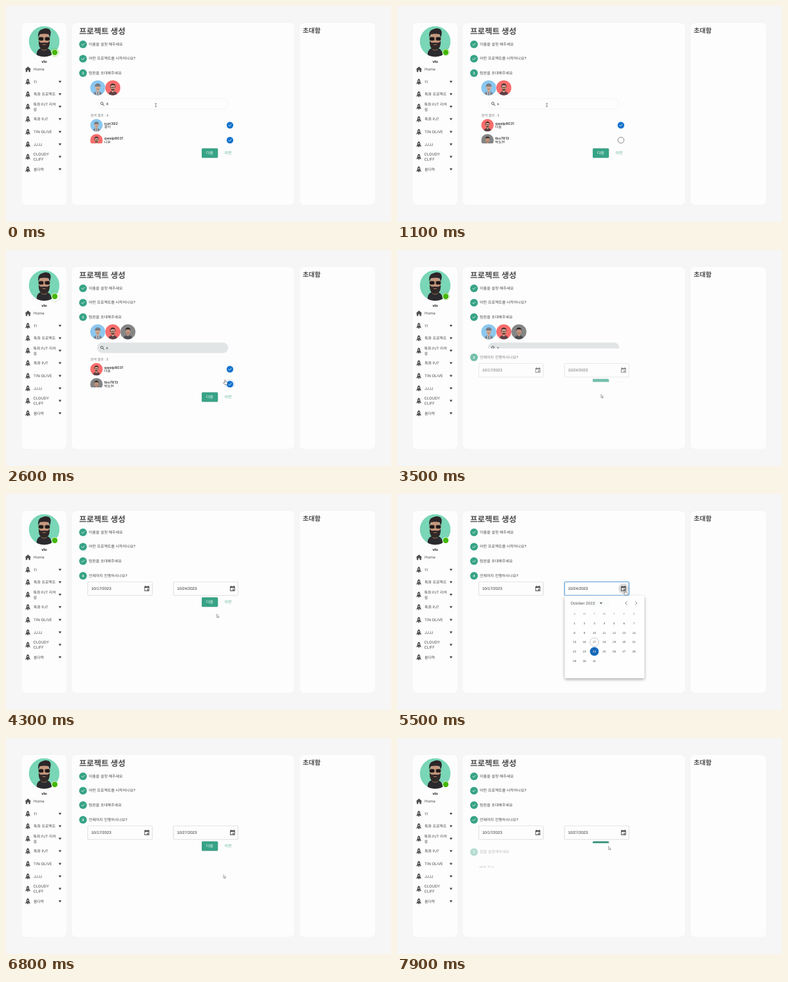
An HTML page that plays this animation: 600 px wide and 338 px high, repeating every 8 s.

```html
<!DOCTYPE html>
<html lang="ko">
<head>
<meta charset="utf-8">
<title>프로젝트 생성</title>
<style>
html, body { margin: 0; width: 100%; height: 100%; overflow: hidden; background: #f6f6f7; }
svg { display: block; width: 600px; height: 338px; }
text { font-family: Inter, "Noto Sans CJK KR", "Noto Sans CJK", sans-serif; fill: #4a4a4a; text-rendering: geometricPrecision; }
.num { font-family: "Liberation Sans", sans-serif; }
.panel { fill: #fdfdfd; stroke: #f0f0f1; stroke-width: .6; }
.line { fill: none; stroke-linecap: round; stroke-linejoin: round; }
.button { filter: drop-shadow(0 .6px .7px rgba(0, 0, 0, .35)); }
#paper { filter: drop-shadow(0 2px 2.5px rgba(0, 0, 0, .35)); }
</style>
</head>
<body>
<svg id="stage" viewBox="0 0 600 338"></svg>
<script>
const LOOP = 8000;
const GREEN = '#37a386', BLUE = '#1472cc', INK = '#4a4a4a';
const stage = document.getElementById('stage');
const $ = id => document.getElementById(id);

// Drawing helpers; text is placed by its vertical centre.
const text = (x, y, s, size = 6, attrs = '') =>
  `<text x="${x}" y="${(y + size * .36).toFixed(2)}" font-size="${size}" ${attrs}>${s}</text>`;
const circle = (x, y, r, fill, attrs = '') => `<circle cx="${x}" cy="${y}" r="${r}" fill="${fill}" ${attrs}/>`;
const rect = (x, y, w, h, r, attrs = '') => `<rect x="${x}" y="${y}" width="${w}" height="${h}" rx="${r}" ${attrs}/>`;
const path = (d, fill, attrs = '') => `<path d="${d}" fill="${fill}" ${attrs}/>`;
const line = (d, color, w = 1) => `<path class="line" d="${d}" stroke="${color}" stroke-width="${w}"/>`;
const at = (x, y, body, scale = 1) => `<g transform="translate(${x} ${y}) scale(${scale})">${body}</g>`;
const use = (id, x, y) => `<use href="#${id}" x="${x}" y="${y}"/>`;
const mid = 'text-anchor="middle"';

const bust = (id, bg, skin, body, extra) => `<g id="${id}"><g clip-path="url(#disc)">
  ${circle(0, 0, 12, bg)}
  ${path('M-7 13C-7 7-4.5 5.4 0 5.4S7 7 7 13Z', body)}
  ${rect(-1.6, 2, 3.2, 5, 1.5, `fill="${skin}"`)}
  <ellipse cx="0" cy="-.7" rx="3.7" ry="4.9" fill="${skin}"/>${extra}</g></g>`;

const defs = `<defs>
  <clipPath id="disc"><circle r="11.8"/></clipPath>
  <clipPath id="bigDisc"><circle r="24"/></clipPath>
  <clipPath id="listClip"><rect x="125" y="176" width="240" height="39"/></clipPath>
  ${[3, 4, 5].map(n => `<clipPath id="clip${n}"><rect id="fold${n}" x="104" width="344"/></clipPath>`).join('')}
  ${bust('blueFace', '#8bc7ef', '#d3a88e', '#7d8894',
    path('M-4.2-2.8C-5-8 5-8 4.2-2.8L5.2-1.9H-5.2Z', '#767c84') +
    path('M-2.4 5.6L0 8L2.4 5.6L1.6 12H-1.6Z', '#dfe5ea') + path('M-.6 7H.6L.5 12H-.5Z', '#2c3743') +
    line('M-1.3 2.2H1.3', '#7a5546', .6))}
  ${bust('redFace', '#f86d6c', '#dca98f', '#5c4247',
    path('M-4.2-.5C-5.4-8.6 5.4-8.6 4.2-.5L3.2-3.4C1-4.4-1-4.4-3.2-3.4Z', '#3a2b2e') +
    line('M-3.2-1.2H-.8V.3H-3.2ZM.8-1.2H3.2V.3H.8ZM-.8-.5H.8', '#33272b', .5) +
    path('M-3 2.2C-2 1.5 2 1.5 3 2.2C2.4 5.4-2.4 5.4-3 2.2Z', '#5c4039'))}
  ${bust('grayFace', '#858585', '#c2917a', '#4a4d53',
    path('M-4-1.4C-5.2-8.2 5.2-8.2 4-1.4L3-3.8H-3Z', '#252427') + line('M-1.2 2.3H1.2', '#75564a', .6))}
  <g id="tick">${line('M-2.2 .1L-.7 1.6L2.2-1.5', '#fff', .8)}</g>
  <g id="checkOn">${circle(0, 0, 5.2, BLUE)}${use('tick', 0, 0)}</g>
  <g id="checkOff">${circle(0, 0, 4.8, '#fff', 'stroke="#555" stroke-width=".7"')}</g>
  <g id="rocket">
    ${path('M0-4.7C2.5-3.2 2.6-.4 1.9 2.5H-1.9C-2.6-.4-2.5-3.2 0-4.7Z', '#4c4c4c')}
    ${path('M-1.9 .2L-3.4 1.9V4L-1.6 3ZM1.9 .2L3.4 1.9V4L1.6 3Z', '#4c4c4c')}
    ${circle(0, 3.4, 1.1, '#4c4c4c')}${circle(0, -1.1, .9, '#fdfdfd')}</g>
  <g id="calIcon">
    ${path('M-3.8-3.4H3.8V4H-3.8ZM-2.9-1.2V3.1H2.9V-1.2Z', '#444', 'fill-rule="evenodd"')}
    ${rect(-2.7, -4.4, 1, 1.5, 0, 'fill="#444"')}${rect(1.7, -4.4, 1, 1.5, 0, 'fill="#444"')}
    ${rect(.2, .5, 2, 2, 0, 'fill="#444"')}</g>
</defs>`;

const portrait = at(59.5, 55.5, `<g clip-path="url(#bigDisc)">
  ${circle(0, 0, 24, '#79d6b6')}
  ${path('M-12 25C-12.5 14-9 10-.5 10S12 14 12 25Z', '#2b2b2f')}
  ${rect(-4.5, 5, 9, 9, 3, 'fill="#8f6351"')}
  <ellipse cx="0" cy="-3" rx="8.2" ry="11.5" fill="#c9977f"/>
  ${path('M-8.8-6C-10.5-13-8-18 -3-19C1-21.5 8-21 9.6-17C11-13 9.6-9 8.6-6L7-11C3-12.5-3-12-7-11Z', '#2c2629')}
  ${path('M-8.6-1C-6 3-4 1.8 0 1.8S6 3 8.6-1C9 8 6 13 0 13S-9 8-8.6-1Z', '#302827')}
  ${line('M-2 5H2', '#b17a6a', 1.1)}
  ${rect(-8.9, -7, 8, 5.8, 2.2, 'fill="#1e191b" stroke="#a08062" stroke-width=".6"')}
  ${rect(.9, -7, 8, 5.8, 2.2, 'fill="#1e191b" stroke="#a08062" stroke-width=".6"')}
  ${line('M-.9-5.4H.9', '#a08062', .8)}</g>`);

const MENU = [
  [118.5, '11'], [138, '특화 프로젝트'], [157.5, '특화 PJT 리허', '설'], [177, '특화 PJT'],
  [197, 'TIN OLIVE'], [216.4, 'JJJJ'], [236, 'CLOUDY', 'CLIFF'], [255.5, '봄다락'],
];
const menu = MENU.map(([y, a, b]) => use('rocket', 34, y) +
  (b ? text(42.5, y - 3.7, a, 5.9) + text(42.5, y + 4, b, 5.9) : text(43, y, a, 5.9)) +
  path(`M82 ${y - 1.5}H86.4L84.2 ${y + 2}Z`, '#444')).join('');

const sidebar = rect(24, 26, 71, 286, 8, 'class="panel"') + portrait +
  `<circle id="ripple" cx="76" cy="72.6" fill="none" stroke="#44b700" stroke-width=".7"/>` +
  circle(76, 72.6, 5.2, '#fdfdfd') + circle(76, 72.6, 4.3, '#44b700') +
  text(59.5, 87, 'vlo', 5.8, `${mid} font-weight="700" style="fill:#222"`) +
  path('M34.3 94.8L39.2 99.3H37.8V103.2H35.4V100.4H33.2V103.2H30.8V99.3H29.4Z', '#4c4c4c') +
  text(43, 99, 'Home') + menu;

const step = (n, y, label) => circle(120, y, 6, GREEN) +
  `<g id="no${n}">${text(120, y, n, 5.2, `${mid} font-weight="600" style="fill:#fff"`)}</g>` +
  `<g id="done${n}">${use('tick', 120, y)}</g>` + text(129, y - .3, label, 6, 'font-weight="500"');

const buttons = (id, y) =>
  rect(305, y - 7.2, 25.2, 14.8, 1.6, `class="button" id="${id}" fill="${GREEN}"`) +
  text(317.5, y - .2, '다음', 6, `${mid} font-weight="500" style="fill:#fff"`) +
  text(346, y - .2, '이전', 6, `${mid} style="fill:#55ae97"`);

const row = (face, y, name, nick, check) => at(141, y, use(face, 0, 0), .83) +
  text(153, y - 3, name, 5.7, 'font-weight="500" style="fill:#222"') +
  text(153, y + 3, nick, 5.5, 'style="fill:#222"') + check;
const on = y => use('checkOn', 349, y);

const invite = use('blueFace', 143, 128) + use('redFace', 166.5, 128) +
  `<g id="picked">${use('grayFace', 190, 128)}</g>` +
  rect(142, 145, 204, 16, 8, 'id="search" stroke-width=".6"') +
  circle(149.4, 152.4, 1.9, 'none', 'stroke="#333" stroke-width=".8"') + line('M150.9 153.9L152.8 155.8', '#333', .9) +
  text(156, 153, '', 5.7, 'id="query" style="fill:#222"') +
  text(131.5, 171, '', 5.2, 'id="count" style="fill:#777"') +
  `<g clip-path="url(#listClip)">
    <g id="listA">${row('blueFace', 186.5, 'nuri392', '콩이', on(186.5))}${row('redFace', 210, 'qwelp8031', '나윤', on(210))}</g>
    <g id="listB">${row('redFace', 186.5, 'qwelp8031', '나윤', on(186.5))}
      ${circle(349, 210, 8, '#e3eefa', 'id="halo"')}
      ${row('grayFace', 210, 'tbo7813', '박도현', `<use id="pick" x="349" y="210"/>`)}</g>
  </g>` + buttons('next3', 230);

const field = (x, id, value) => rect(x, 137.3, 100.6, 21.6, 1.6, `id="${id}" fill="#fdfdfd" stroke="#c8c8c8" stroke-width=".6"`) +
  text(x + 5.5, 148, value, 6.2, `class="num" id="${id}Text" style="fill:#333"`);
const dates = field(127.4, 'from', '10/17/2023') + use('calIcon', 219.5, 148) +
  field(261, 'until', '') + circle(353, 148, 8, '#dcdcdc', 'id="iconHover"') + use('calIcon', 353, 148) +
  buttons('next4', 169);

const dayX = d => 276.3 + 15.55 * ((d - 1) % 7);
const dayY = d => 203 + 14.9 * Math.floor((d - 1) / 7);
const days = Array.from({ length: 31 }, (_, i) => i + 1);
const calendar = `<g id="calendar">${rect(261, 159, 125, 131, 1.6, 'id="paper" fill="#fff"')}
  ${text(270, 171, 'October 2023', 6.3, 'class="num"')}
  ${path('M315.7 170H320.3L317.9 172.5Z', '#555')}
  ${line('M358.4 168.6L356 171L358.4 173.4M372 168.6L374.4 171L372 173.4', '#666', .9)}
  ${[...'SMTWTFS'].map((c, i) => text(dayX(i + 1), 187.5, c, 4.5, `class="num" ${mid} style="fill:#999"`)).join('')}
  ${circle(dayX(17), dayY(17), 6.9, 'none', 'stroke="#999" stroke-width=".5"')}
  ${circle(dayX(27), dayY(27), 7, '#e6f0fa', 'id="dayHover"')}
  <g id="chosen">${circle(0, 0, 7, BLUE)}<circle id="pulse" fill="#0f5aa6"/></g>
  ${days.map(d => text(dayX(d), dayY(d), d, 4.7, `class="num" id="day${d}" ${mid}`)).join('')}</g>`;

const hand = path('M-1-3.6C-1-4.7.5-4.7.5-3.6V-1L3.3-.3C4-.1 4.2.4 4 1L3.4 4H-1L-3.3.9C-3.5.2-2.6-.2-2 .3L-1 1.2Z',
  '#fff', 'stroke="#444" stroke-width=".6" transform="translate(0 3.6) scale(.88)"');
const arrow = path('M0 0V5.2L1.3 4.1L2.1 6L3 5.6L2.2 3.8H3.9Z', '#fff', 'stroke="#555" stroke-width=".5"');
const ibeam = line('M-1.2-2.8Q0-2.8 0-2V2Q0 2.8-1.2 2.8M1.2-2.8Q0-2.8 0-2M0 2Q0 2.8 1.2 2.8', '#555', .6);

stage.innerHTML = defs + rect(0, 0, 600, 338, 0, 'fill="#f6f6f7"') + sidebar +
  rect(102, 26, 347.5, 286, 8, 'class="panel"') + rect(457, 26, 119, 286, 8, 'class="panel"') +
  text(114, 39.6, '프로젝트 생성', 12.5, 'font-weight="700"') + text(462.5, 38.2, '초대함', 10, 'font-weight="700"') +
  step(1, 60, '이름을 설정 해주세요') + step(2, 82.5, '어떤 프로젝트를 시작하나요?') + step(3, 105, '팀원을 초대해주세요') +
  `<g clip-path="url(#clip3)">${invite}</g>
  <g id="step4">${step(4, 128, '언제까지 진행하시나요?')}<g clip-path="url(#clip4)">${dates}</g></g>
  <g id="step5">${step(5, 151, '집을 설정해주세요')}<g clip-path="url(#clip5)">${text(128, 175, '레포 주소')}</g></g>` +
  calendar + `<g id="cursor"><g id="ibeam">${ibeam}</g><g id="hand">${hand}</g><g id="arrow">${arrow}</g></g>`;

// Pointer path: time, x, y, shape from that time on.
const POINTER = [
  [0, 233.5, 155, 'ibeam'], [1350, 233.5, 155, 'ibeam'], [1500, 250, 165, 'arrow'], [1950, 341.5, 203.5, 'hand'],
  [2700, 341.5, 203.5, 'arrow'], [3150, 318, 226, 'hand'], [3500, 318, 226, 'arrow'], [4000, 328.5, 188, 'arrow'],
  [4500, 328.5, 188, 'arrow'], [5000, 356, 151, 'hand'], [5550, 356, 151, 'hand'], [6150, 353.5, 246, 'hand'],
  [6400, 353.5, 246, 'arrow'], [6750, 339, 214, 'arrow'], [7050, 339, 214, 'arrow'], [7500, 329.5, 169.5, 'hand'],
  [7850, 329.5, 169.5, 'arrow'], [8000, 329.5, 169.5, 'arrow'],
];

const clamp = v => Math.min(1, Math.max(0, v));
const mix = (a, b, p) => a + (b - a) * p;
const bezier = (x1, x2, y2) => x => {
  let lo = 0, hi = 1;
  for (let i = 0; i < 18; i++) {
    const u = (lo + hi) / 2;
    if (3 * u * (1 - u) ** 2 * x1 + 3 * u * u * (1 - u) * x2 + u ** 3 < x) lo = u; else hi = u;
  }
  return 3 * lo * lo * (1 - lo) * y2 + lo ** 3;
};
const standard = bezier(.4, .2, 1), easeInOut = bezier(.42, .58, 1);
const run = (t, start, span) => standard(clamp((t - start) / span));
const set = (id, attrs) => { for (const k in attrs) $(id).setAttribute(k, attrs[k]); };
const show = (id, yes) => set(id, { visibility: yes ? 'inherit' : 'hidden' });
const write = (id, s) => { if ($(id).textContent !== s) $(id).textContent = s; };

function drawSteps(t) {
  const toDates = run(t, 3370, 300), toNext = run(t, 7812, 300);
  const h3 = 126 * (1 - toDates), h4 = 43 * toDates * (1 - toNext);
  set('fold3', { y: 114, height: h3 });
  set('fold4', { y: 137, height: h4 });
  set('fold5', { y: 160, height: 43 * toNext });
  set('step4', { transform: `translate(0 ${h3})`, opacity: toDates });
  set('step5', { transform: `translate(0 ${h4})`, opacity: toNext });
  const current = t < 3370 ? 3 : t < 7812 ? 4 : 5;
  for (let n = 1; n <= 5; n++) {
    show('no' + n, n >= current);
    show('done' + n, n < current);
  }
  set('next3', { fill: t > 3100 ? '#2f8f75' : GREEN });
  set('next4', { fill: t > 7450 ? '#2f8f75' : GREEN });
}

function drawInvite(t) {
  const second = t >= 700, picked = t >= 2200;
  write('query', t < 400 ? 'd' : second ? 's' : '');
  write('count', `검색 결과 : ${second ? 5 : 4}`);
  show('listA', !second);
  show('listB', second);
  show('picked', picked);
  show('halo', t >= 1900 && t < 2800);
  set('pick', { href: picked ? '#checkOn' : '#checkOff' });
  set('search', picked ? { fill: '#e2e5e6', stroke: '#e2e5e6' } : { fill: '#fdfdfd', stroke: '#ececec' });
}

function drawDates(t) {
  const changed = t >= 6280, focus = t >= 5230 && t < 6400;
  write('untilText', changed ? '10/27/2023' : '10/24/2023');
  set('until', { stroke: focus ? '#2b83cf' : '#c8c8c8', 'stroke-width': focus ? 1 : .6 });
  show('iconHover', t >= 4950 && t < 5650);

  const open = run(t, 5265, 300) * (1 - run(t, 6330, 220));
  const s = mix(.75, 1, open);
  show('calendar', open > 0);
  set('calendar', { opacity: open, transform: `translate(323.5 159) scale(${s} ${s * s}) translate(-323.5 -159)` });
  const day = changed ? 27 : 24;
  set('chosen', { transform: `translate(${dayX(day)} ${dayY(day)})` });
  set('pulse', { r: 5.2 + .6 * Math.sin(t / 400), opacity: changed ? 0 : .7 });
  show('dayHover', t >= 6100);
  for (const d of [24, 27]) $('day' + d).style.fill = d === day ? '#fff' : INK;
}

function drawPointer(t) {
  const i = POINTER.findLastIndex(k => k[0] <= t);
  const a = POINTER[i], b = POINTER[i + 1] || a;
  const p = easeInOut(clamp((t - a[0]) / (b[0] - a[0] || 1)));
  set('cursor', { transform: `translate(${mix(a[1], b[1], p)} ${mix(a[2], b[2], p)})` });
  for (const shape of ['ibeam', 'hand', 'arrow']) show(shape, shape === a[3]);
}

function drawRipple(t) {
  const p = easeInOut(((t + 540) % 1200) / 1200);
  set('ripple', { r: 4.3 * mix(.8, 2.4, p), opacity: 1 - p });
}

const origin = performance.now();
function frame() {
  const t = Math.max(0, performance.now() - origin) % LOOP;
  [drawSteps, drawInvite, drawDates, drawPointer, drawRipple].forEach(draw => draw(t));
  requestAnimationFrame(frame);
}
frame();
</script>
</body>
</html>
```
